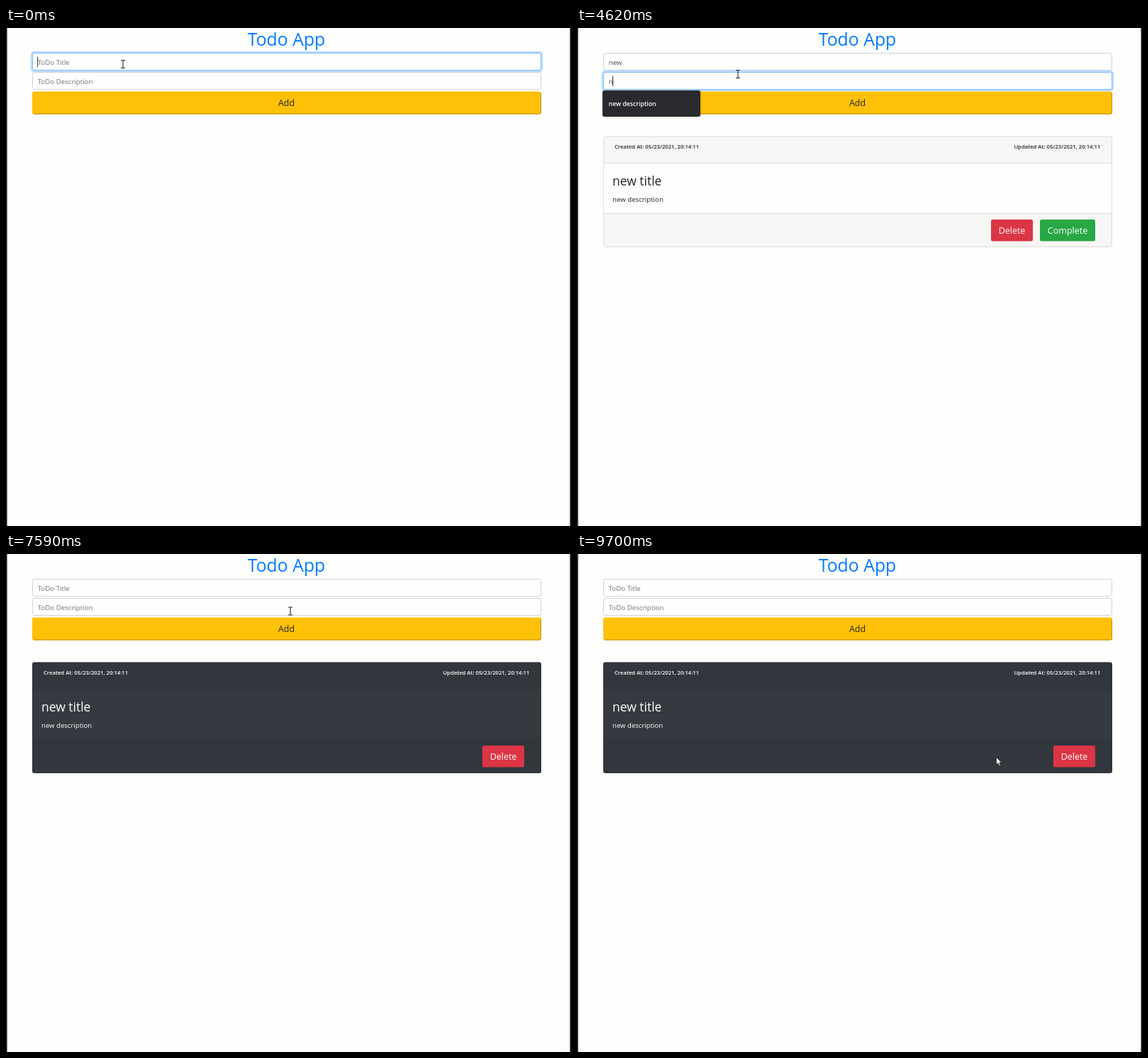
Animation, 797 px wide and 702 px high, one loop 10 s. Source, as an HTML page:

```html
<!DOCTYPE html>
<html lang="en">
<head>
<meta charset="utf-8">
<title>Todo App</title>
<style>
  html, body { margin: 0; width: 100%; height: 100%; overflow: hidden; background: #fefefd; }
  svg { display: block; width: 797px; height: 702px; }
  text { font-family: "Open Sans", "Noto Sans", sans-serif; white-space: pre; }
  .head { font-size: 24.8px; font-weight: 500; fill: #007bff; }
  .form { font-size: 9.7px; fill: #495057; }
  .hint { fill: #6c757d; }
  .mid { text-anchor: middle; }
  .btn { font-size: 12.5px; fill: #fff; text-anchor: middle; }
  .stamp { font-size: 7.7px; font-weight: 600; }
  .name { font-size: 17.5px; font-weight: 500; }
  .light { fill: #212529; }
  .dark { fill: #fff; }
  .dark .form { fill: #fff; font-weight: 500; font-size: 9.6px; }
  .light .form { fill: #212529; }
  .drop { font-size: 8.7px; font-weight: 600; fill: #fff; }
</style>
</head>
<body>
<svg viewBox="0 0 797 702">
  <rect width="797" height="702" fill="#fefefd"/>
  <rect width="1.5" height="702" fill="#111"/>
  <rect x="795.6" width="1.4" height="702" fill="#111"/>
  <text class="head mid" x="395.5" y="25">Todo App</text>

  <g id="fields"></g>

  <g id="add">
    <rect class="ring" x="36" y="88" width="720" height="35" rx="3.5" fill="none" stroke="#ffc107" stroke-opacity=".5" stroke-width="3"/>
    <rect class="face" x="37" y="89.5" width="718" height="32" rx="2.7"/>
    <path class="edge" d="M754.5 92V119Q754.5 121 752 121H39" fill="none" stroke="#b98c05"/>
    <rect class="ring" x="37.7" y="90" width="716.6" height="31" rx="2.5" fill="none" stroke="#101010" stroke-width="1.5"/>
    <text class="btn mid" style="fill:#212529" x="395.5" y="110">Add</text>
  </g>

  <g id="cards"></g>

  <g id="drop">
    <rect x="36" y="88.5" width="138" height="37" rx="3" fill="#000" opacity=".25" style="filter:blur(1.5px)"/>
    <rect x="36" y="88" width="138" height="37" rx="3" fill="#292a2d"/>
    <text class="drop" x="44.7" y="110"></text>
  </g>

  <g id="cursor">
    <path data-kind="beam" d="M-3 -5.5H-.8L0 -5L.8 -5.5H3M0 -5V5M-3 5.5H-.8L0 5L.8 5.5H3" fill="none" stroke="#222" stroke-width="1.1"/>
    <path data-kind="arrow" d="M.4 .4V11.2L2.9 8.8L4.7 12.8L6.6 12L4.8 8.1H8.2Z" fill="#fff" stroke="#222" stroke-width=".9"/>
    <path data-kind="hand" d="M-1 1Q0 -.6 1 1V5.2Q2 4.2 2.8 5.3Q3.8 4.5 4.6 5.8Q6.4 5.2 6.4 7.2V10.2L5 13V14.8H-1V13L-4 9Q-4.2 7.2 -2.6 7.6L-1 9.2Z" fill="#fff" stroke="#222" stroke-width=".9"/>
  </g>
</svg>

<script>
const LOOP = 10000, BLINK = 150, SLOT = 172;
const $ = (q, root = document) => root.querySelector(q);
const show = (el, on) => { el.style.visibility = on ? 'inherit' : 'hidden'; };

// ---------- markup ----------
const field = (id, y, hint) => `
  <g id="${id}">
    <rect class="glow" x="36" y="${y - 1.5}" width="720" height="27" rx="3.5" fill="none" stroke="#007bff" stroke-opacity=".27" stroke-width="2.5"/>
    <rect class="box" x="37.5" y="${y}" width="717" height="24" rx="2.5" fill="#fefefd"/>
    <text class="form hint" x="44.7" y="${y + 16.3}">${hint}</text>
    <text class="form value" x="44.7" y="${y + 16.3}"></text>
    <rect class="caret" y="${y + 5}" width="1" height="14.5" fill="#333"/>
  </g>`;

const button = (kind, x, w, label) => `
  <rect class="${kind}" data-x="${x}" data-w="${w}" x="${x}" y="270" width="${w}" height="30.6" rx="2.7"/>
  <text class="btn" x="${x + w / 2}" y="290">${label}</text>`;

const card = (key, c, done) => `
  <g id="card-${key}" class="${done ? 'dark' : 'light'}">
    <rect x="37" y="152.5" width="718" height="156.5" rx="3" fill="${done ? '#343a40' : '#fefefd'}"/>
    <path d="M37.5 190V155.5Q37.5 153 40 153H752Q754.5 153 754.5 155.5V190ZM37.5 262H754.5V306Q754.5 308.5 752 308.5H40Q37.5 308.5 37.5 306Z" fill="#000" opacity="${done ? .05 : .03}"/>
    <rect x="37.5" y="153" width="717" height="155.5" rx="2.7" fill="none" stroke="#000" stroke-opacity=".125"/>
    <path d="M38 190.5H754M38 261.5H754" stroke="#000" stroke-opacity=".125"/>
    <text class="stamp" x="53" y="169.8">Created At: 05/23/2021, ${c.time}</text>
    <text class="stamp" x="738.3" y="169.8" text-anchor="end">Updated At: 05/23/2021, ${c.time}</text>
    <text class="name" x="50" y="221.8">${c.title}</text>
    <text class="form" x="50" y="244.6">${c.desc}</text>
    ${done ? button('del', 672, 59, 'Delete')
           : button('del', 584, 59, 'Delete') + button('ok', 653, 78, 'Complete')}
  </g>`;

const items = {
  a: { time: '20:14:11', title: 'new title', desc: 'new description' },
  b: { time: '20:14:20', title: 'new', desc: 'new new new' },
  c: { time: '20:14:33', title: 'new', desc: 'new' }
};

$('#fields').innerHTML = field('title', 35.5, 'ToDo Title') + field('desc', 62.5, 'ToDo Description');
// An upper-case key is the completed form of a card.
$('#cards').innerHTML = Object.entries(items)
  .map(([k, c]) => card(k, c, false) + card(k.toUpperCase(), c, true)).join('');

// ---------- timeline ----------
const events = [];
const at = (time, patch) => events.push({ time, patch });
const type = (name, text, from, to, start, gap) => {
  for (let i = from; i < to; i++) at(start + (i - from) * gap, { [name]: text.slice(0, i + 1) });
};
const added = (time, cards) => at(time, { cards, title: '', desc: '' });
const HINT_T = 'new title', HINT_D = 'new description';

at(0, { focus: 'title', title: '', desc: '', drop: '', cards: '' });
type('title', HINT_T, 0, 1, 160, 0);
type('title', HINT_T, 1, 9, 480, 65);
at(1050, { focus: 'desc' });
type('desc', HINT_D, 0, 4, 1130, 100);
type('desc', HINT_D, 4, 10, 1590, 66);
type('desc', HINT_D, 10, 15, 2220, 80);
at(2700, { focus: 'add' });
added(2850, 'a');

at(3420, { focus: 'title', drop: HINT_T });
type('title', 'new', 0, 2, 3600, 140);
type('title', 'new', 2, 3, 3940, 0);
at(4300, { focus: 'desc', drop: HINT_D });
type('desc', 'new new new', 0, 9, 4600, 64);
at(4856, { drop: '' });
type('desc', 'new new new', 9, 11, 5180, 150);
at(5480, { focus: 'add' });
added(5600, 'ba');
at(6250, { focus: '', cards: 'Ba' });
at(7000, { cards: 'BA' });
at(7320, { cards: 'A' });

at(7870, { focus: 'title', drop: HINT_T });
type('title', 'new', 0, 3, 8250, 150);
at(8620, { focus: 'desc', drop: '' });
at(8680, { drop: HINT_D });
type('desc', 'new', 0, 3, 8680, 60);
at(8860, { focus: 'add', drop: '' });
added(8900, 'cA');
at(9400, { focus: '', cards: 'A' });

events.sort((p, q) => p.time - q.time);
let state = {};
const states = events.map(e => (state = { ...state, ...e.patch, time: e.time }));

const path = [
  [0, 165, 51], [2900, 165, 46], [3150, 193, 84], [3250, 193, 84], [3420, 227, 49],
  [4150, 227, 49], [4300, 227, 65], [5650, 227, 65], [6150, 700, 285], [6250, 700, 285],
  [6480, 712, 330], [6850, 728, 452], [7000, 728, 452], [7240, 712, 285], [7320, 712, 285],
  [7510, 420, 88], [7800, 321, 49], [8930, 321, 49], [9000, 443, 141], [9250, 613, 287],
  [9450, 613, 287], [9680, 591, 286], [LOOP, 591, 286]
];
// Spans in which the pointer is hidden by typing.
const hidden = [[60, 2930], [3600, 4150], [4650, 5650], [8230, 8930]];

function pointer(t) {
  const i = path.findIndex(p => p[0] > t);
  const [t0, x0, y0] = path[i - 1], [t1, x1, y1] = path[i];
  const u = (t - t0) / (t1 - t0), k = u * u * (3 - 2 * u);
  return { x: x0 + (x1 - x0) * k, y: y0 + (y1 - y0) * k, on: !hidden.some(h => t >= h[0] && t < h[1]) };
}

// ---------- drawing ----------
const inside = (p, x, y, w, h) => p.on && p.x >= x && p.x <= x + w && p.y >= y && p.y <= y + h;
const paint = { del: ['#dc3545', '#c82333'], ok: ['#28a745', '#218838'] };

function drawField(id, s, t) {
  const g = $('#' + id), value = $('.value', g), focused = s.focus === id;
  if (value.textContent !== s[id]) value.textContent = s[id];
  show($('.hint', g), !s[id]);
  show($('.glow', g), focused);
  $('.box', g).setAttribute('stroke', focused ? '#80bdff' : '#ced4da');
  const caret = $('.caret', g);
  caret.setAttribute('x', 44.2 + (s[id] ? value.getComputedTextLength() : 0));
  show(caret, focused && (t - s.time) % (2 * BLINK) < BLINK);
}

function drawCards(s, p) {
  let over = false;
  for (const g of $('#cards').children) {
    const slot = s.cards.indexOf(g.id.slice(-1)), dy = slot * SLOT;
    show(g, slot >= 0);
    if (slot < 0) continue;
    g.setAttribute('transform', `translate(0 ${dy})`);
    for (const b of g.querySelectorAll('.del, .ok')) {
      const hot = inside(p, +b.dataset.x, 270 + dy, +b.dataset.w, 30.6);
      b.setAttribute('fill', paint[b.classList[0]][+hot]);
      over = over || hot;
    }
  }
  return over;
}

function draw(t) {
  const s = states.findLast(v => v.time <= t), p = pointer(t);
  drawField('title', s, t);
  drawField('desc', s, t);

  const addFocus = s.focus === 'add', addHot = inside(p, 37, 89.5, 718, 32);
  document.querySelectorAll('#add .ring').forEach(r => show(r, addFocus));
  show($('#add .edge'), !addFocus);
  $('#add .face').setAttribute('fill', addFocus || addHot ? '#e0a800' : '#ffc107');

  const hot = drawCards(s, p) || addHot;

  show($('#drop'), s.drop);
  $('#drop text').textContent = s.drop;
  $('#drop').setAttribute('transform', `translate(0 ${s.focus === 'title' ? -27.3 : 0})`);

  const text = inside(p, 37, 36, 718, 23) || inside(p, 37, 63, 718, 20);
  const kind = hot ? 'hand' : text ? 'beam' : 'arrow';
  $('#cursor').setAttribute('transform', `translate(${p.x} ${p.y})`);
  for (const c of $('#cursor').children) show(c, p.on && c.dataset.kind === kind);
}

const start = performance.now();
function tick() {
  draw((performance.now() - start) % LOOP);
  requestAnimationFrame(tick);
}
tick();
</script>
</body>
</html>
```
